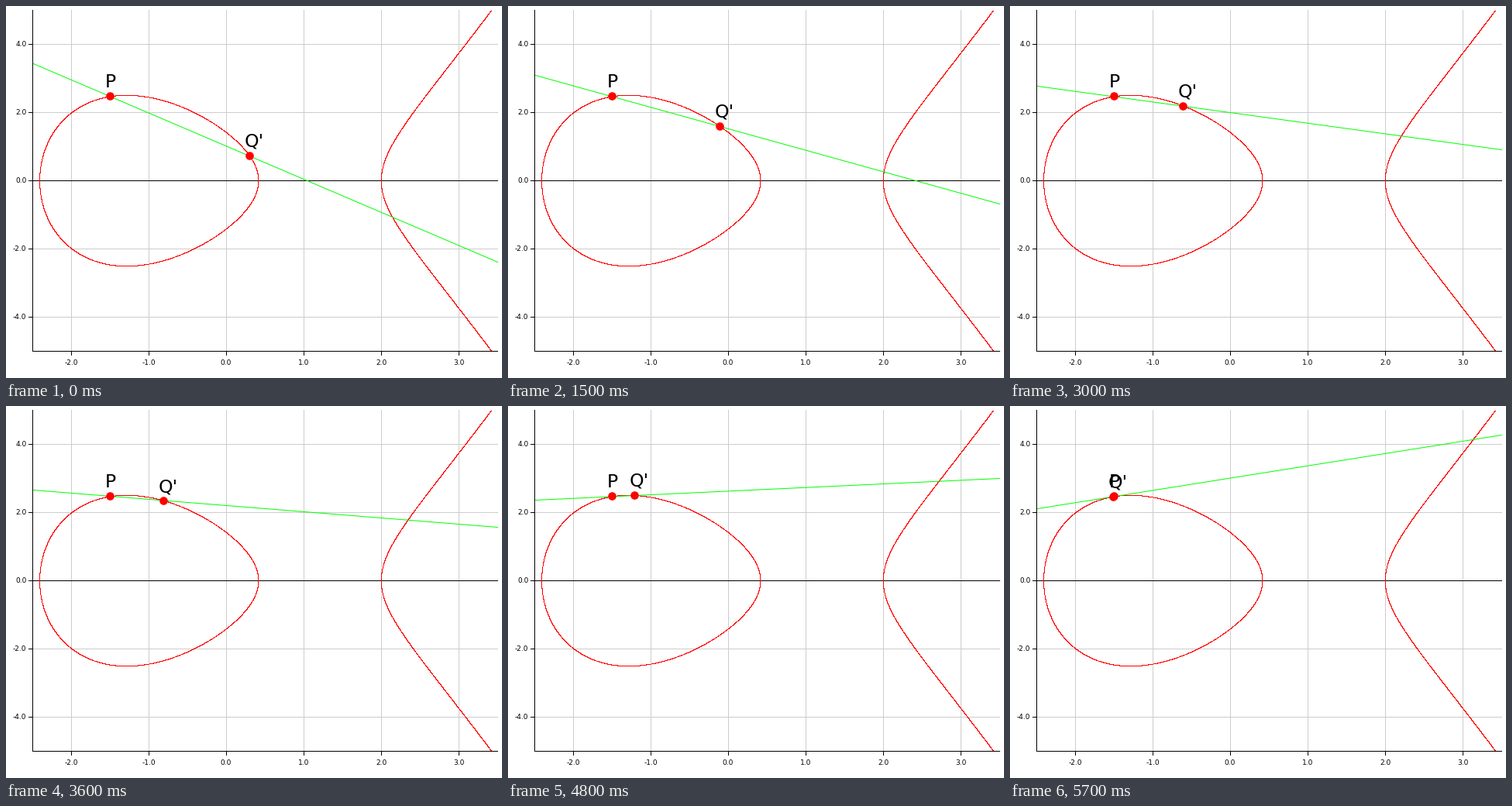
Animation of 640x480 px, one loop 6300 ms. Source, as a matplotlib script:

```python
import math

import numpy as np
import matplotlib.pyplot as plt
from matplotlib.animation import FuncAnimation
from matplotlib.patches import Circle

W, H, DPI = 640, 480, 100
PX = 72 / DPI                      # one pixel in points
LEFT, RIGHT, TOP, BOTTOM = 35, 634, 5, 444   # plot area, inclusive
X_MIN, X_MAX, Y_MIN, Y_MAX = -2.5, 3.5, -5, 5
STEP_MS, FRAMES = 300, 21
P_X = -1.5
RED, GREEN, GRID = "#ff0000", "#00ff00", "#cccccc"

plt.rcParams["font.family"] = "DejaVu Sans"
fig = plt.figure(figsize=(W / DPI, H / DPI), dpi=DPI, facecolor="white")
ax = fig.add_axes([0, 0, 1, 1])
ax.set_xlim(0, W)
ax.set_ylim(H, 0)
ax.axis("off")


def col(x):
    """Pixel column of x."""
    share = (np.asarray(x) - X_MIN) / (X_MAX - X_MIN)
    return LEFT + np.floor((RIGHT - LEFT) * share + 1e-3).astype(int)


def row(y):
    """Pixel row of y."""
    share = (np.asarray(y) - Y_MIN) / (Y_MAX - Y_MIN)
    return BOTTOM - np.floor((BOTTOM - TOP) * share + 1e-3).astype(int)


def curve_y(x):
    return math.sqrt(x**3 - 5 * x + 2)


def stroke(x0, y0, x1, y1, color, z):
    """Crisp one-pixel line covering both end pixels."""
    dx, dy = (0.5, 0) if y0 == y1 else (0, 0.5)
    ax.plot([x0 + 0.5 - dx, x1 + 0.5 + dx], [y0 + 0.5 - dy, y1 + 0.5 + dy],
            color=color, lw=PX, snap=False, solid_capstyle="butt", zorder=z)


def draw_chart():
    for x in range(-2, 4):
        c = col(x)
        stroke(c, TOP, c, BOTTOM, GRID, 1)
        stroke(c, BOTTOM + 1, c, BOTTOM + 6, "black", 2)
        ax.text(c, 462.6, f"{x:.1f}", size=9 * PX,
                ha="center", va="baseline")
    for y in range(-4, 5, 2):
        r = row(y)
        stroke(LEFT, r, RIGHT, r, GRID, 1)
        stroke(LEFT - 6, r, LEFT - 1, r, "black", 2)
        ax.text(26.5, r + 3, f"{y:.1f}", size=9 * PX,
                ha="right", va="baseline")
    stroke(LEFT - 1, TOP, LEFT - 1, BOTTOM + 1, "black", 2)
    stroke(LEFT, BOTTOM + 1, RIGHT, BOTTOM + 1, "black", 2)
    stroke(LEFT, row(0), RIGHT, row(0), "black", 2)


def draw_curve():
    # y^2 = x^3 - 5x + 2 = (2 - x)(2 - (x + 1)^2), set in whole pixels
    t = np.linspace(0, 2 * np.pi, 6000)
    x = -1 + math.sqrt(2) * np.cos(t)
    oval = x, np.sqrt(2 * (2 - x)) * np.sin(t)
    s = np.linspace(-1.25, 1.25, 5000)
    x = 2 + s**2
    y = s * np.sqrt(x**2 + 2 * x - 1)
    keep = np.abs(y) <= Y_MAX
    ink = np.zeros((H, W, 4))
    for x, y in (oval, (x[keep], y[keep])):
        ink[row(y), col(x)] = (1, 0, 0, 1)
    ax.imshow(ink, extent=(0, W, H, 0), aspect="auto",
              interpolation="nearest", zorder=3)


def make_point(name):
    dot = ax.add_patch(Circle((0, 0), 5.3, fc=RED, lw=0, zorder=5))
    label = ax.text(0, 0, name, size=23.5 * PX, va="baseline", zorder=6)
    return dot, label


def place(point, x):
    dot, label = point
    c, r = col(x), row(curve_y(x))
    dot.center = c + 0.5, r + 0.5
    label.set_position((c - 6, r - 11))


draw_chart()
draw_curve()
secant, = ax.plot([], [], color=GREEN, lw=PX, snap=False,
                  solid_capstyle="projecting", zorder=4)
p, q = make_point("P"), make_point("Q'")
place(p, P_X)


def q_at(n):
    """One short step from 0.3, then steps of 0.1, then a rest."""
    return 0.3 - 0.01 * max(0, 10 * min(n, 19) - 9)


def update(n):
    x = q_at(n)
    y0 = curve_y(P_X)
    slope = (curve_y(x) - y0) / (x - P_X)
    ends = np.array([X_MIN, X_MAX])
    secant.set_data(col(ends) + 0.5, row(y0 + slope * (ends - P_X)) + 0.5)
    place(q, x)
    return secant, *q


anim = FuncAnimation(fig, update, frames=FRAMES, interval=STEP_MS,
                     init_func=lambda: update(0), repeat=True, repeat_delay=0)
plt.show()
```
